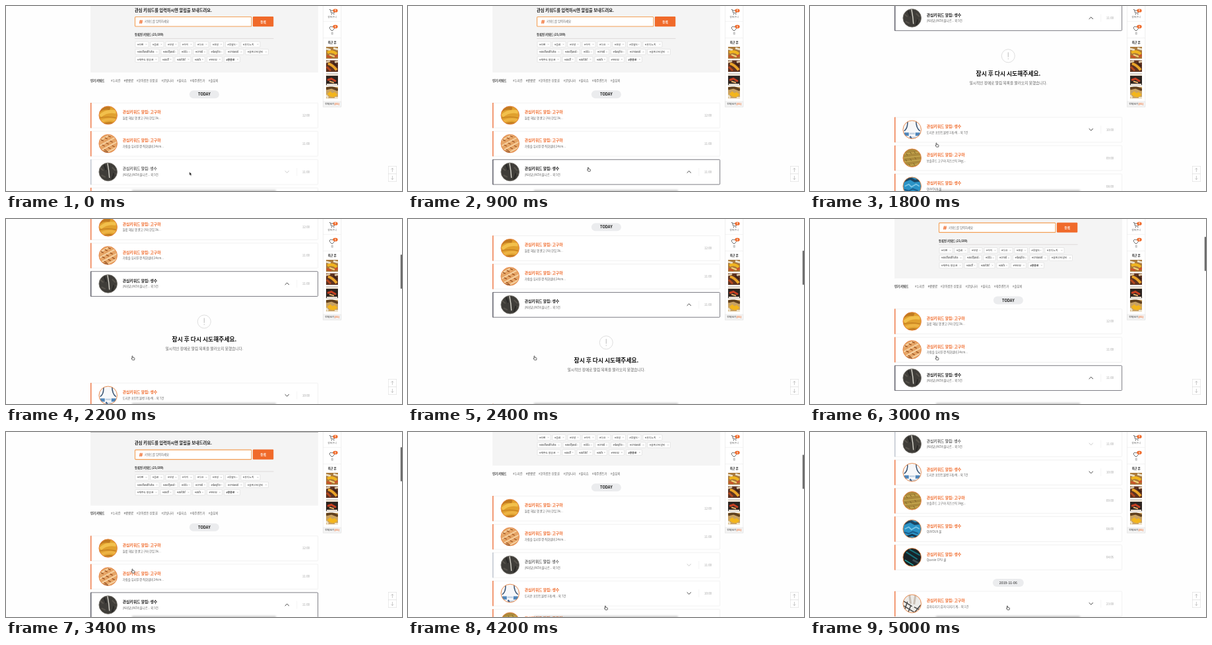
Animation, 600 px wide and 281 px high, one loop 5100 ms. Source, as an HTML page:

```html
<!DOCTYPE html>
<html>
<head>
<meta charset="utf-8">
<style>
  html, body { margin: 0; width: 100%; height: 100%; overflow: hidden; background: #fefefe; }
  svg { display: block; width: 600px; height: 281px; }
  text { font-family: "Noto Sans CJK KR", "Noto Sans CJK JP", "Noto Sans", sans-serif; white-space: pre; }
</style>
</head>
<body>
<svg id="stage" viewBox="0 0 600 281"></svg>
<script>
const LOOP = 5100, STEP = 100;
const ORANGE = '#f06a2a', INK = '#1c1c1c', GREY = '#606060', PALE = '#e8e8e8', ACTIVE = '#5c5c66';
const SCROLL_END = 233.7, PANEL_HEIGHT = 126.5, OPEN_AT = 900, CLOSE_AT = 4100;

const scrollKeys = [[900, 0], [1000, 58], [1100, 175], [1200, SCROLL_END], [1900, SCROLL_END],
  [2200, 153.6], [2700, 74.2], [3100, -10.6], [4100, -10.6], [4200, 50], [4300, 172], [4400, SCROLL_END]];
const cursorXKeys = [[300, 279.5], [600, 274], [1400, 274], [1800, 192.5], [3400, 192.5], [3900, 300]];
const cursorYKeys = [[300, 255], [600, 248], [1400, 248], [1800, 211], [3400, 211], [3900, 267]];
const barKeys = [[900, 0], [1000, 1], [1400, 1], [1700, 0], [1900, 0], [2000, 1], [4800, 1], [5000, 0]];

function at(keys, t) {
  const i = keys.findIndex(k => k[0] > t);
  if (i < 0) return keys[keys.length - 1][1];
  if (i === 0) return keys[0][1];
  const [t0, a] = keys[i - 1], [t1, b] = keys[i];
  return a + (b - a) * (t - t0) / (t1 - t0);
}

// y is the middle of the line
const text = (s, x, y, size, fill = GREY, weight = 400, anchor = 'start') =>
  `<text x="${x}" y="${y + size * .36}" font-size="${size}" fill="${fill}" font-weight="${weight}" text-anchor="${anchor}">${s}</text>`;
const rect = (x, y, w, h, fill, stroke = 'none', rx = 0, sw = .6) =>
  `<rect x="${x}" y="${y}" width="${w}" height="${h}" rx="${rx}" fill="${fill}" stroke="${stroke}" stroke-width="${sw}"/>`;
const path = (d, stroke, sw = 1, fill = 'none') =>
  `<path d="${d}" stroke="${stroke}" stroke-width="${sw}" fill="${fill}"/>`;
const circle = (x, y, r, fill, stroke = 'none', sw = 1) =>
  `<circle cx="${x}" cy="${y}" r="${r}" fill="${fill}" stroke="${stroke}" stroke-width="${sw}"/>`;
const group = (x, y, body) => `<g transform="translate(${x} ${y})">${body}</g>`;

const DEFS = `<defs>
  <clipPath id="round"><circle r="13.8"/></clipPath>
  <clipPath id="square"><rect width="18" height="18"/></clipPath>
  <filter id="blur" x="-20%" y="-100%" width="140%" height="300%"><feGaussianBlur stdDeviation="1.6"/></filter>
</defs>`;

// background, then [path, colour, width] strokes
const photos = {
  potato: ['#e0a02e', ['M-14-7Q-6-13 3-10', '#c07a20', 5], ['M-12 1Q-2-8 12-5', '#f2c04c', 5],
    ['M-13 4Q0 1 12 4', '#c98422', 1.6], ['M-10 9Q2 4 13 8', '#edb343', 4], ['M-7 13Q3 10 10 13', '#b9761f', 2]],
  grill: ['#e6a566', ['M-14-4L4-14M-14 4L12-10M-12 11L14-3M-3 14L14 5', '#f6d3a4', 1.8],
    ['M-11-6l4 2m2-5l4 2m1-5l4 2M-9 2l4 2m2-5l4 2m2-5l4 2M-6 9l4 2m2-5l4 2m2-5l4 2', '#99501f', 1.3],
    ['M-13 8Q-8 14 0 13', '#5b3318', 2]],
  stone: ['#3f3d39', ['M-12-6l5 4M-10 5l6 3M6-7l5 5M7 6l4-4', '#57534c', 2],
    ['M-6-11l3 8M9 2l-3 9', '#2a2927', 2.4], ['M-1-14L1-2L2 9', '#d5d3ca', 1.4]],
  bottle: ['#f7f8fa', ['M-7-14Q-6-2-12 2M6-14Q6-2 12 2', '#34506f', 1.5],
    ['M-12 7H-5M5 7H12', '#4f86ba', 5], ['M-4 6H4M-5 12H6', '#c3d2e2', 2.5], ['M-3 10l2 4', '#3c5f8b', 2]],
  sticks: ['#ab8a3c', ['M-12-6L12-9M-13 0L13-3M-12 6L13 3M-8 12L10 9', '#c7a950', 1.6],
    ['M-9-7l2 3m4-5l2 3m4-4l2 3M-10 2l2 3m5-4l2 3m5-5l2 3M-5 9l2 3m5-4l2 3', '#7d6227', 1]],
  blue: ['#2b93c6', ['M-13-8L-3-12L4-8L12-9', '#1b4663', 4], ['M-11 0l6-3l4 4l7-4l5 3', '#7cc5e5', 1.8],
    ['M-12 5l7 2l6-3l8 3', '#1a5d8c', 2], ['M-9 12L0 9L8 12', '#16384f', 3]],
  dark: ['#172328', ['M-9-8L8 3M-4-12L12-3', '#176f78', 2], ['M-11 4L2 12', '#28a59e', 1.4],
    ['M1 4L10 9', '#3b4b50', 3]],
  plaid: ['#ecebe8', ['M-13 3L5 14M-13-4L0 4M-6 13L-2 3M-12 11L-7-3M4 13L13 2M3 5L13 10', '#4a4947', 1.5],
    ['M-4-13L-2 0M5-13L3 1', '#c9bfb4', 3]],
};
const layers = strokes => strokes.map(s => path(...s)).join('');
const photo = (name, ring) => {
  const [bg, ...strokes] = photos[name];
  return `<g clip-path="url(#round)">${circle(0, 0, 14, bg)}${layers(strokes)}</g>`
    + circle(0, 0, 13.8, 'none', ring, .9);
};

const cards = [
  { y: 147, title: '고구마', sub: '들밭 해남 햇 꿀고구마 한입 3k...', time: '12:00', pic: 'potato' },
  { y: 190, title: '고구마', sub: '가람솔 유리뚜껑 직화냄비 24cm...', time: '11:00', pic: 'grill' },
  { y: 233, title: '생수', sub: '[K마당](NOV)물나르... 외 9건', time: '11:00', pic: 'stone', more: true, read: true },
  { y: 276, title: '생수', sub: '도리온 포인트물병 1개/색... 외 7건', time: '10:00', pic: 'bottle', more: true },
  { y: 319, title: '고구마', sub: '보솔푸드 고구마 치즈스틱 1kg(...', time: '09:00', pic: 'sticks' },
  { y: 362, title: '생수', sub: 'QUVOLN 물', time: '08:00', pic: 'blue' },
  { y: 405, title: '생수', sub: 'Quvoln CPU 쿨', time: '04:05', pic: 'dark' },
  { y: 475.5, title: '고구마', sub: '감자다지기 감자 다지기 계... 외 1건', time: '23:00', pic: 'plaid', more: true },
];

function card({ y, title, sub, time, pic, more, read }, open) {
  const active = read && open;
  let out = rect(128.4, .3, 344.2, 37.8, '#fff', active ? ACTIVE : PALE, 1, active ? .8 : .6)
    + rect(128, 0, 1.4, 38.4, active ? ACTIVE : read ? '#bcc3cd' : '#ee7440')
    + group(154.7, 19, photo(pic, read ? '#77736c' : '#e5813f'))
    + text('관심키워드 알림: ' + title, 176.7, 14.2, 5.8, read ? INK : ORANGE, read && !active ? 400 : 700)
    + text(sub, 176.7, 23.4, 4.4)
    + text(time, 460, 19.2, 4.4, '#a0a0a0', 400, 'end');
  if (more) {
    out += path('M440.7 13V25', '#eee', .6)
      + path(active ? 'M422.7 20.6L425.8 17.6L428.9 20.6' : 'M422.7 17.4L425.8 20.4L428.9 17.4',
        read && !active ? '#c4c4c4' : '#333', .9);
  }
  return group(0, y, out);
}

// labels, left edges, and the right end of the row
const tagRows = [
  ['라면 음료 안녕 하이 다크 초당 루왈드 휴디노치', [196, 219, 242, 264, 287, 310, 332.5, 356], 385],
  ['asdfasdfiuha asdfjasd dd1 cmid dasjfio cmiasid 솔뫼선비갈비', [196, 235, 263, 284, 307.5, 333, 363], 397.5],
  ['제주도_항공권 asdf asfdsf asfs 990원 콩콩로', [196, 234, 256, 283, 304.5, 330.5], 354.5],
];
const tags = tagRows.map(([labels, xs, end], row) => labels.split(' ').map((label, i) => {
  const x = xs[i], right = (xs[i + 1] || end + 3) - 3, y = 58.3 + row * 11.4;
  return rect(x, y - 4.2, right - x, 8.4, '#fff', '#d2d2d2', .6, .5)
    + text('#' + label.replace('_', ' '), x + 3, y, 3.9, '#333', label === '콩콩로' ? 700 : 400)
    + path(`M${right - 4.5} ${y - 1}l2 2m0-2l-2 2`, '#aaa', .45);
}).join('')).join('');

const popular = ['누리칸', '콩콩로', '한아름돈 상품권', '글빛나라', '물티슈', '제주렌트카', '솔담비'];
const popularX = [159, 178.5, 198, 235.5, 259, 279, 307];

const header = rect(128, -11, 345, 112, '#f4f4f4') + rect(128, -11.3, 345, 1, '#333')
  + text('관심 키워드를 입력하시면 알림을 보내드려요.', 195, 6.4, 6.25, INK, 700)
  + rect(195.5, 16.5, 176.5, 14.5, '#fff', '#f3a057', 1, 1.1)
  + path('M203.8 21l-1 6m3.2-6l-1 6m-2.8-4h5m-5.4 2h5', ORANGE, .95)
  + text('키워드를 입력하세요', 210, 23.8, 4.35)
  + rect(374, 16, 31.3, 15.2, ORANGE, 'none', 1) + text('등록', 389.7, 23.8, 4.9, '#fff', 700, 'middle')
  + text('등록된 키워드 (21/100)', 195, 43.7, 4.35, INK, 700)
  + path('M195 49.4H405.5', '#cfc8c8', .6) + tags
  + text('인기 키워드', 128, 113, 4.4, INK, 700)
  + popular.map((p, i) => text('#' + p, popularX[i], 113, 4.4, p === '콩콩로' ? '#333' : GREY)).join('');

const pill = (label, y, size, w, weight) => rect(300.4 - w / 2, y - 6, w, 12, '#ebecee', 'none', 6)
  + text(label, 300.4, y, size, INK, weight, 'middle');

const panel = circle(300.3, 76.5, 10, '#fff', '#c8c8c8', .6)
  + path('M300.3 71V78.4M300.3 80.3V81.6', '#b5b5b5', .9)
  + text('잠시 후 다시 시도해주세요.', 300.5, 103.8, 8.8, '#111', 700, 'middle')
  + text('일시적인 장애로 알림 목록을 불러오지 못했습니다.', 300.5, 117.3, 5.7, GREY, 400, 'middle');

const badge = y => rect(495.4, y - 2.6, 7.2, 5.2, ORANGE, 'none', 2.6) + text('0', 499, y, 3.6, '#fff', 700, 'middle');
const thumb = (y, bg, ...strokes) => group(485, y,
  `<g clip-path="url(#square)">${rect(0, 0, 18, 18, bg)}${layers(strokes)}</g>`);
const sidebar = rect(480.3, -2, 27.6, 155, '#fff', '#e4e4e4')
  + path('M489.8 5.5h1.6l1.4 5.2h4.4l1-3.8h-6', '#444', .8) + circle(493.4, 12.6, .7, '#444') + circle(496.8, 12.6, .7, '#444')
  + badge(7) + text('장바구니', 494.2, 17, 3.6, '#555', 400, 'middle')
  + path('M480.5 23.4H507.7M480.5 48.6H507.7', '#e9e9e9', .6)
  + path('M494 38l-3.3-3.4a2 2 0 0 1 3.3-2.6a2 2 0 0 1 3.3 2.6z', '#444', .8)
  + badge(31.3) + text('찜', 494.2, 42, 3.6, '#555', 400, 'middle')
  + text('최근 본', 494.2, 55.2, 4.3, INK, 700, 'middle')
  + thumb(62, '#a9783a', ['M0 3L7 5M11 2L18 4', '#eadfc6', 3], ['M2 9Q9 5 16 11', '#f0b41f', 4],
    ['M1 14L8 16M12 15L18 13', '#c9542a', 3], ['M5 12L13 15', '#f5d27a', 2])
  + thumb(82.3, '#5d3220', ['M0 3L6 1M13 3L18 2', '#d9c4a5', 3], ['M3 5Q10 7 16 15', '#eaa429', 4],
    ['M1 10L7 16', '#b3471f', 3], ['M11 4L17 9', '#392018', 2])
  + thumb(102.5, '#2c2420', ['M0 2H18M1 17H17', '#e9dfd2', 3], ['M2 10L8 8L15 12', '#c63f21', 3],
    ['M5 12L12 14', '#e8ad68', 2])
  + thumb(122.5, '#c9a263', ['M0 3L8 1L18 5', '#61411f', 4], ['M4 9Q10 16 15 10', '#f3b51c', 6],
    ['M0 13L3 17M13 17H18', '#ece0c6', 3])
  + rect(480.3, 145, 27.6, 8.2, '#f3f3f3', '#e4e4e4')
  + text(`전체보기<tspan fill="${ORANGE}" font-weight="700">(31)</tspan>`, 494.2, 149, 3.9, '#333', 400, 'middle');

const jumpButtons = rect(579.3, 243.3, 12.4, 11.7, '#fff', '#dedede') + rect(579.3, 255, 12.4, 11.7, '#fff', '#dedede')
  + path('M585.4 252V246.3m-2 2l2-2l2 2M585.4 258V263.7m-2-2l2 2l2-2', '#a5a5a5', .6);
const shadow = `<g filter="url(#blur)">${rect(191, 279.5, 218, 8, 'rgba(0,0,0,.22)')}</g>`;

const arrow = path('M-1.6-3.2V2.2L-.4 1.2L.5 3.2L1.5 2.8L.7.9H2.2Z', '#fff', .5, '#111');
const hand = path('M-1.6-2.6q.7-.7 1.2.1l.2 2l2.2.5q.7.3.5 1.2l-.5 1.9H-1L-2.5.8q0-.7 1.2-.2z', '#222', .7, '#fff');

function scene(t) {
  const open = t >= OPEN_AT && t < CLOSE_AT;
  const scroll = at(scrollKeys, t);
  const list = items => items.map(item => card(item, open)).join('');
  const page = header + pill('TODAY', 134.2, 5.7, 45, 700) + list(cards.slice(0, 3))
    + (open ? group(0, 233, panel) : '')
    + group(0, open ? PANEL_HEIGHT : 0, list(cards.slice(3)) + pill('2019-11-06', 462.8, 5.3, 47, 500));
  return DEFS + group(0, -scroll, page) + shadow + sidebar + jumpButtons
    + `<g opacity="${at(barKeys, t)}">${rect(597.8, 25 + .189 * scroll, 2.2, 52, '#6a6a6a', 'none', 1)}</g>`
    + group(at(cursorXKeys, t), at(cursorYKeys, t), t < 600 ? arrow : hand);
}

const stage = document.getElementById('stage');
let shown = -1;
function tick() {
  const t = Math.floor(performance.now() % LOOP / STEP) * STEP;
  if (t !== shown) stage.innerHTML = scene(shown = t);
  requestAnimationFrame(tick);
}
tick();
</script>
</body>
</html>
```
